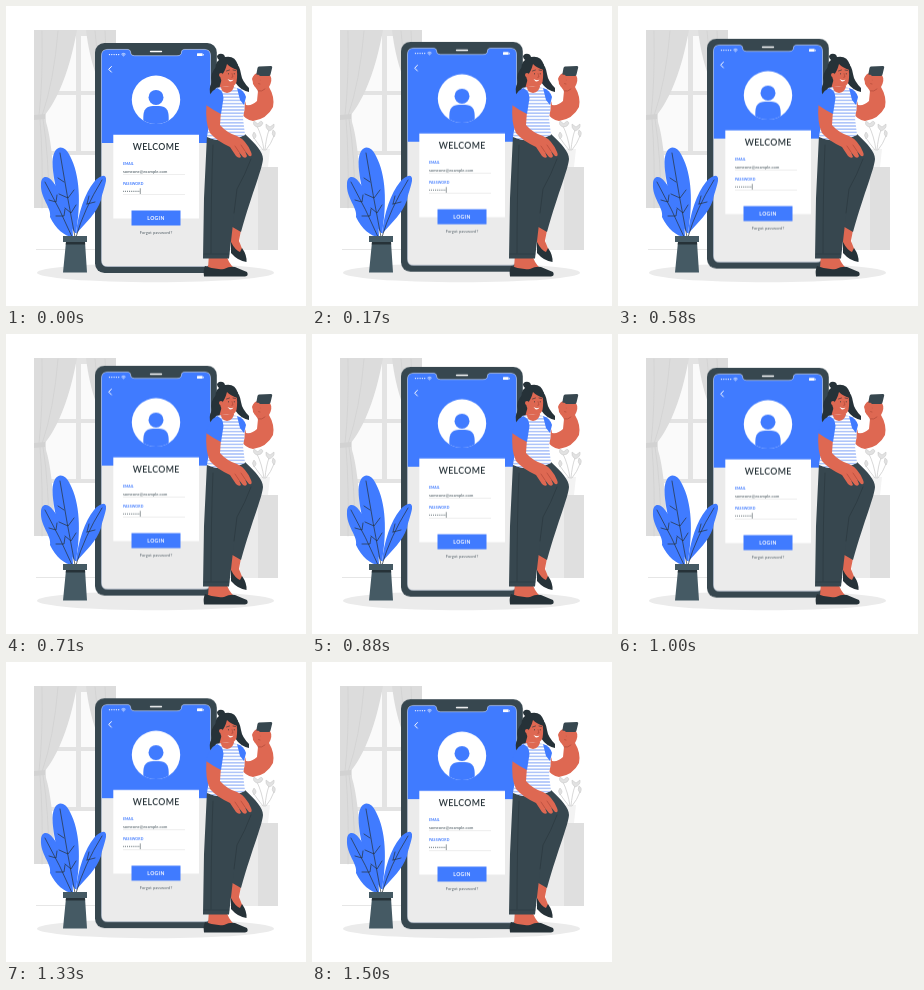
Recreate the animation shown at these times as an HTML page. Size 300x300 px, loop 1540 ms.

```html
<!DOCTYPE html>
<html lang="en">
<head>
<meta charset="utf-8">
<title>Login</title>
<style>
  html, body { margin: 0; width: 100%; height: 100%; overflow: hidden; background: #fff; }
  svg { display: block; width: 100vw; height: 100vh; }
  text { font-family: Lato, sans-serif; }
  .dark { fill: #37474f; }
  .black { fill: #263238; }
  .blue { fill: #407bff; }
  .skin { fill: #de6852; }
  .line { fill: none; stroke-linecap: round; stroke-linejoin: round; }
  .phone { animation: float 1540ms linear infinite; }
  @keyframes float {
    0% { transform: translateY(0); }
    47% { transform: translateY(-5.5px); }
    95.5% { transform: translateY(.2px); }
    100% { transform: translateY(0); }
  }
</style>
</head>
<body>
<svg viewBox="0 0 300 300">
  <defs>
    <clipPath id="screen"><path id="glass" d="M101.500 43.400H121.500Q124.500 43.400 124.500 46Q124.500 49.800 128.500 49.800H171Q175.500 49.800 175.500 46Q175.500 43.400 178.500 43.400H198.500Q204.500 43.400 204.500 49.400V254.500Q204.500 260.500 198.500 260.500H101.500Q95.500 260.500 95.500 254.500V49.400Q95.500 43.400 101.500 43.400Z"/></clipPath>
    <clipPath id="avatar"><circle cx="150" cy="93.800" r="24.200"/></clipPath>
    <clipPath id="shirt"><path id="top" d="M210 82Q222 79 231 82Q238 85 239 94Q239 104 237 112L239 129Q219 139 201 131Q204 114 205 101Z"/></clipPath>
    <pattern id="stripes" width="4" height="3.200" patternUnits="userSpaceOnUse"><path stroke="#6f97f5" stroke-width=".9" d="M0 1.600H4"/></pattern>
  </defs>

  <g id="room">
    <path fill="#e3e3e3" d="M28 24H110V149H28Z"/>
    <path fill="#fafafa" d="M40 30H70V85H40ZM75 30H110V85H75ZM40 89H70V145H40ZM75 89H110V145H75Z"/>
    <path fill="#dcdcdc" d="M28 24H71C64 62 53 92 38 110C45 128 48 160 49 202H28Z"/>
    <path fill="#dcdcdc" d="M80 24H110V102C94 86 84 58 80 24Z"/>
    <path class="line" stroke="#cbcbcb" stroke-width=".5" d="M36 25Q37 75 33 109M52 25Q48 75 36 110M34 113Q37 150 36 202M37 113Q43 150 43 202M89 25Q91 60 104 86M99 25Q99 54 108 80"/>
    <path fill="#d2d2d2" d="M28 109L39 108V113L28 114Z"/>
    <path stroke="#e0e0e0" stroke-width=".8" d="M30 243.500H272"/>
    <path fill="#ebebeb" d="M234 161H252V244H234Z"/>
    <path fill="#dfdfdf" d="M252 161H272V244H252Z"/>
    <path fill="#f3f3f3" d="M252 143H264L262 161H254Z"/>
    <path class="line" stroke="#c8c8c8" stroke-width=".7" d="M258 144Q256 130 251 120M259 144Q260 132 263 124M260 144Q265 138 268 130M257 144Q252 138 248 132"/>
    <path fill="#e2e2e2" stroke="#c4c4c4" stroke-width=".5" d="M251 121Q246 119 248 115L252 118Q255 113 257 117Q256 121 251 121ZM263 125Q259 122 260 118L264 121L268 118Q269 123 263 125ZM268 131Q265 128 267 124Q271 126 268 131ZM248 133Q245 129 248 126Q252 130 248 133Z"/>
  </g>

  <ellipse cx="149.500" cy="266.700" rx="118.500" ry="9.500" fill="#ebebeb"/>

  <g class="phone">
    <rect class="dark" x="89" y="37" width="121.800" height="230" rx="9.500"/>
    <use href="#glass" fill="#ebebeb"/>
    <path class="blue" clip-path="url(#screen)" d="M95 43H205V137H95Z"/>
    <use href="#glass" fill="none" stroke="#d5e0fa" stroke-width=".4"/>
    <path class="line" stroke="#fff" stroke-width="1.300" d="M144.500 45.500H155.500"/>
    <path class="line" stroke="#fff" stroke-width="1.400" stroke-dasharray="0 2.300" d="M103.500 48.600H113.500"/>
    <path class="line" stroke="#fff" stroke-width=".7" d="M115.700 48Q117.500 46.500 119.300 48M116.500 49Q117.500 48.200 118.500 49M117.500 49.900V50"/>
    <rect x="191" y="47.200" width="5.600" height="2.800" rx=".5" fill="#fff"/>
    <path fill="#fff" d="M197 47.900H197.700V49.400H197Z"/>
    <path class="line" stroke="#fff" stroke-width="1" d="M105.400 60.500L102.700 63.300L105.400 66.100"/>

    <circle cx="150" cy="93.800" r="24.200" fill="#fff"/>
    <g class="blue" clip-path="url(#avatar)">
      <circle cx="150" cy="91.400" r="7.500"/>
      <path d="M137.300 119V111Q137.300 100 147 100H153Q162.700 100 162.700 111V119Z"/>
    </g>

    <path fill="#fff" d="M107.300 128.700H193V212.500H107.300Z"/>
    <text class="black" x="150.200" y="144.500" font-size="8.800" font-weight="600" letter-spacing=".35" text-anchor="middle">WELCOME</text>
    <g class="blue" font-size="3.500" font-weight="700">
      <text x="117" y="159.300">EMAIL</text>
      <text x="117" y="179.300" letter-spacing=".1">PASSWORD</text>
    </g>
    <text x="117" y="166.800" font-size="4" letter-spacing=".1" fill="#37474f">someone@example.com</text>
    <path class="line" stroke="#37474f" stroke-width="1" stroke-dasharray="0 1.900" d="M117.700 185.300H133.200"/>
    <path stroke="#263238" stroke-width=".5" d="M134.300 182.300V188"/>
    <path stroke="#dcdcdc" stroke-width=".5" d="M117 168.500H179M117 188.500H179"/>
    <path class="blue" d="M125.500 204.400H174.500V219.600H125.500Z"/>
    <text x="150" y="213.900" font-size="5.100" font-weight="700" letter-spacing=".3" text-anchor="middle" fill="#fff">LOGIN</text>
    <text x="150" y="227.900" font-size="4" letter-spacing=".1" text-anchor="middle" fill="#546068">Forgot password?</text>
  </g>

  <g id="plant">
    <g class="blue">
      <path d="M69 227C58 211 47 182 46.500 156C47 139 58 137 64 150C74 169 75 197 70 227Z"/>
      <path d="M67 231C59 231 49 222 44 211C46 202 34 192 35 178C35 169 42 169 47 176C59 190 67 209 67 231Z"/>
      <path d="M70 228C72 207 79 187 88 176C94 169 101 167 100 175C98 184 96 188 95 194C90 208 81 215 70 228Z"/>
    </g>
    <path class="line" stroke="#263238" stroke-width=".7" d="M54 147Q61 190 69 231M39 176Q54 203 67 233M96 174Q78 203 70 231M52 172L58 176M53 188L62 192L68 184M59 202L65 207L70 199M43 194L50 196L51 189M50 210L58 210L59 203M81 198L83 190M81 198L89 196"/>
    <path fill="#455a64" d="M57 230H81V236H79L81 266.500H57L60 236H57Z"/>
    <path class="black" d="M60 236H79L79.200 238.500H59.700Z"/>
  </g>

  <g id="woman">
    <path class="skin" d="M225 219L235 224L233 235L239 250L233 251L225 240Z"/>
    <path class="black" d="M225 236Q229 244 234 246L236 242Q241 249 240.500 256Q232 255 225 247Z"/>
    <path class="dark" d="M218 128H239C250 138 257 146 257 153C256 164 247 184 235 226L223 219L230 172Z"/>
    <path class="skin" d="M203 248H220Q222 257 229 263L214 266L202 262Z"/>
    <path class="black" d="M199 260Q209 264 218 263Q224 260 229 261Q236 264 241 266Q243 270 239 270.500H198Q197 264 199 260Z"/>
    <path class="dark" d="M201 129Q220 136 238 129Q246 142 245 153Q241 165 231 183L223 252.500H197L198 192Z"/>
    <path class="line" stroke="#263238" stroke-width=".5" d="M245 153Q239 169 231 183L228 207M207 139Q205 185 205 247M198 248H223"/>

    <path class="skin" d="M234 88Q239 92 240 99Q246 100 251 95L252 85L247 78Q246 71 249 68L254 66L264 69Q267 74 263 81Q269 91 267 101Q261 113 247 115Q239 114 235 106Z"/>
    <path class="line" stroke="#9e3e30" stroke-width=".5" d="M252 85Q256 86 259 83M249 73L254 74M249 77L254 78"/>
    <path class="dark" d="M253 60.500L265 60Q266.500 60 266.200 61.500L264.500 68.500Q264 70 262.500 70H251.500Q250 70 250.300 68.500L251.500 62Q251.800 60.600 253 60.500Z"/>
    <path class="skin" d="M246 73Q247 69 250 68.500L253.500 69L253 72L254.500 74L252 77L253 80L249 81Z"/>

    <path class="black" d="M211 60Q203 68 206 76Q202 83 205 90Q211 88 214 82L220 66Z"/>
    <path class="skin" d="M216 72L227 75L228 83Q221 89 213 83Z"/>
    <use href="#top" fill="#fff"/>
    <path clip-path="url(#shirt)" fill="url(#stripes)" d="M200 80H242V136H200Z"/>
    <path class="skin" d="M215 81L228 80Q227 86 221 87Q215 86 215 81Z"/>
    <path class="blue" d="M231 82Q238 84 240 91L238 99L234 94Z"/>

    <path class="skin" d="M200.500 98L215 105L214 119Q221 127 231 130Q240 134 245 146Q247 151 243 150L239 145L241 150Q240 153 237 151L233 146L235 151Q233 153 230 150L224 141Q211 135 204 127Q199 117 200.500 98Z"/>
    <path class="line" stroke="#9e3e30" stroke-width=".5" d="M239 145L235 139M233 146L229 140"/>
    <path class="blue" d="M211 82Q217 84 217.500 92L215 108Q207 104 200 99Q203 86 211 82Z"/>

    <path class="black" d="M228 54Q234 60 235 68Q236 75 243 82L243 86Q234 84 229 76Z"/>
    <path class="skin" d="M215 60Q223 54 230 59Q232 68 230.500 76Q228 82 222 80Q215 77 214 70Z"/>
    <path class="black" d="M210 68Q208 57 213 54Q209 50 213 48Q218 47 219 51Q229 49 232 59L232 64Q225 62 221 58Q219 66 215 70Z"/>
    <circle class="skin" cx="215" cy="69" r="2"/>
    <path class="line" stroke="#263238" stroke-width=".6" d="M220.500 65L223.500 64M227 64L229.500 64.500M222.500 67.500V68M228.300 67.500V68"/>
    <path class="line" stroke="#9e3e30" stroke-width=".5" d="M226 67.500L227 71L225.700 71.300"/>
    <path fill="#fff" d="M221.500 73Q224.500 75 227.500 73.500Q226 76 223.500 75.300Z"/>
  </g>
</svg>
</body>
</html>
```
